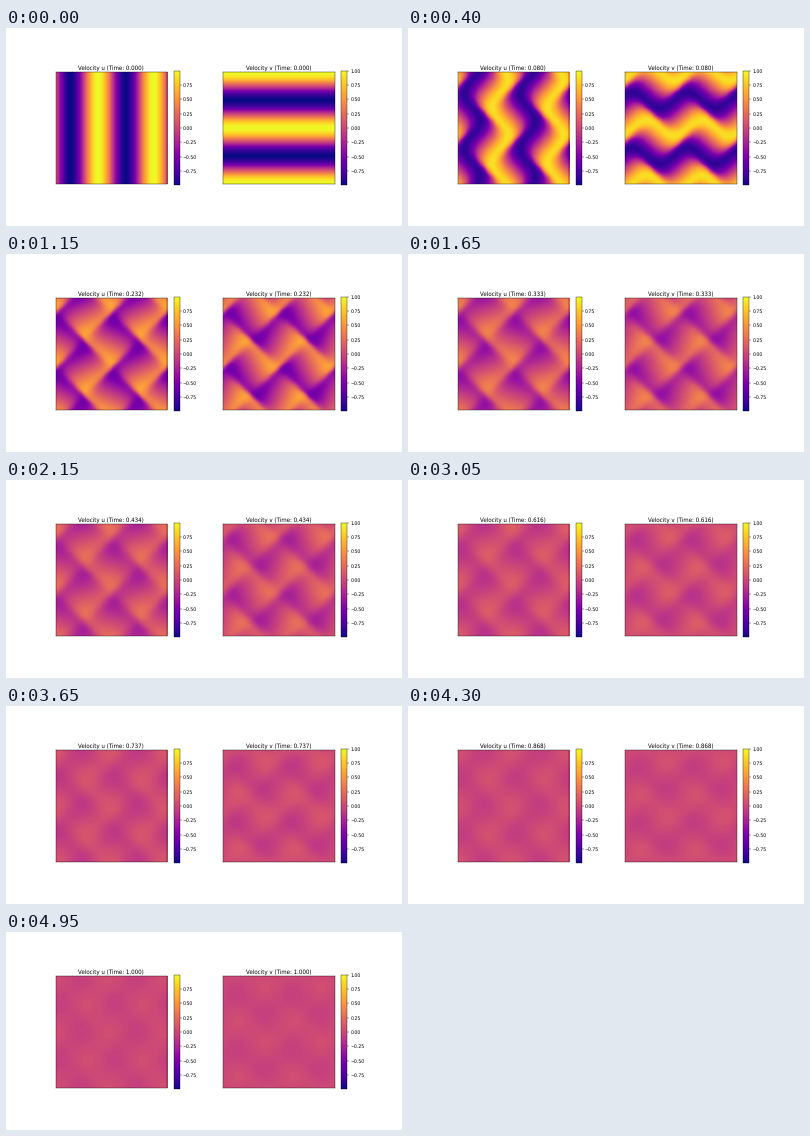
A matplotlib script that plays this animation: 396 px wide and 198 px high, repeating every 5000 ms.

```python
import numpy as np
import matplotlib.pyplot as plt
from matplotlib.animation import FuncAnimation

plt.rcParams["font.family"] = "DejaVu Sans"
plt.rcParams["text.hinting"] = "none"

CELLS = 99          # periodic cells per side
STEPS = 1000
FRAMES = 100
NU = 0.01           # viscosity
DX = 1 / CELLS
DT = 1 / STEPS


def diff(f, axis):
    """Central first derivative on the periodic grid."""
    return (np.roll(f, -1, axis) - np.roll(f, 1, axis)) / (2 * DX)


def laplacian(f):
    total = sum(np.roll(f, s, a) for s in (1, -1) for a in (0, 1))
    return (total - 4 * f) / DX**2


def rate(f, u, v):
    """Burgers equation: u carries along rows, v along columns."""
    return NU * laplacian(f) - u * diff(f, 0) - v * diff(f, 1)


def solve():
    """Velocity fields at the steps shown, with the seam repeated."""
    s = np.arange(CELLS) * DX
    x, y = np.meshgrid(s, s, indexing="ij")
    u, v = -np.sin(4 * np.pi * y), np.cos(4 * np.pi * x)
    shown = [k * STEPS // (FRAMES - 1) for k in range(FRAMES)]
    wanted = set(shown)
    fields = []
    for step in range(STEPS + 1):
        if step in wanted:
            fields.append([np.pad(f, (0, 1), mode="wrap") for f in (u, v)])
        du, dv = rate(u, u, v), rate(v, u, v)
        u, v = u + DT * du, v + DT * dv
    return shown, fields


shown, fields = solve()

fig, axes = plt.subplots(1, 2, figsize=(12, 6), dpi=33)
images = []
for ax, field in zip(axes, fields[0]):
    image = ax.imshow(field, cmap="plasma")
    ax.set_xticks([])
    ax.set_yticks([])
    fig.colorbar(image, ax=ax, shrink=0.75)
    images.append(image)


def update(k):
    for ax, image, field, name in zip(axes, images, fields[k], "uv"):
        image.set_data(field)
        ax.set_title(f"Velocity {name} (Time: {shown[k] * DT:.3f})")
    return images


anim = FuncAnimation(fig, update, frames=FRAMES, interval=50,
                     repeat=True, repeat_delay=0)
plt.show()
```
